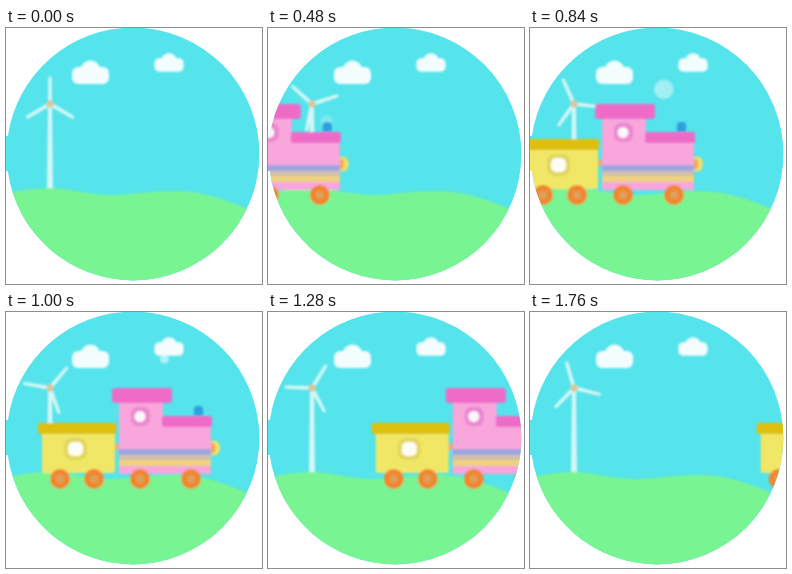
Write an HTML page that moves like this. It is 256 by 256 pixels and loops after 1800 ms.

```html
<!DOCTYPE html>
<html lang="en">
<head>
<meta charset="utf-8">
<title>Train and windmill</title>
<style>
  html, body { margin: 0; width: 100%; height: 100%; overflow: hidden; background: #fff; }
  svg { display: block; width: 100vw; height: 100vh; }
</style>
</head>
<body>
<svg viewBox="0 0 256 256">
  <defs>
    <clipPath id="disc">
      <circle cx="127" cy="126" r="126.4"/>
      <rect y="108" width="4" height="35"/>
    </clipPath>
    <filter id="soft" filterUnits="userSpaceOnUse" x="-20" y="-20" width="300" height="300">
      <feGaussianBlur stdDeviation="1"/>
    </filter>
    <g id="blade"><path d="M-2 0L-1.6 -26Q0 -30 1.6 -26L2 0Z"/></g>
    <g id="wheel">
      <circle r="10" fill="#f0872f"/>
      <circle r="4" fill="#dfa05c"/>
    </g>
    <g id="cloud">
      <rect x="-18.5" y="-8.5" width="37" height="17" rx="6"/>
      <circle cy="-5" r="10"/>
    </g>
  </defs>
  <g clip-path="url(#disc)">
    <rect width="256" height="256" fill="#55e3ec"/>
    <g filter="url(#soft)">
      <g fill="#f3fdfe">
        <use href="#cloud" x="84.5" y="47.5"/>
        <use href="#cloud" transform="translate(163 37) scale(.79)"/>
      </g>
      <g fill="#d6f7f6">
        <path d="M42 78H46L47 161H41Z"/>
        <g id="rotor">
          <use href="#blade"/>
          <use href="#blade" transform="rotate(120)"/>
          <use href="#blade" transform="rotate(240)"/>
        </g>
      </g>
      <circle cx="44" cy="76" r="3.7" fill="#d8c79c"/>
      <path fill="#79f493" d="M-20 170C5 164 25 160 44 160C68 161 82 167 108 167C130 166 145 163 166 163C196 163 215 170 242 181L280 196V280H-20Z"/>

      <circle id="puff" fill="#fff"/>
      <!-- x = 0 is the front wheel of the engine -->
      <g id="train">
        <rect x="-78" y="132" width="8" height="6" fill="#e9a878"/>
        <rect x="-149" y="119" width="73" height="42" rx="2" fill="#f1e766"/>
        <rect x="-153" y="111" width="78" height="11" rx="2" fill="#dfbf10"/>
        <rect x="-127" y="126" width="23" height="22" rx="8" fill="#e2d65c"/>
        <rect x="-123" y="130" width="15" height="14" rx="5" fill="#fdfdf4"/>

        <rect x="3" y="94" width="9" height="13" rx="3" fill="#2f9fdd"/>
        <ellipse cx="23" cy="136" rx="6" ry="7.5" fill="#f2e068"/>
        <rect x="18" y="131" width="6" height="10" rx="2" fill="#eda95c"/>
        <rect x="-72" y="86" width="44" height="76" fill="#f8a6dc"/>
        <rect x="-30" y="108" width="50" height="54" fill="#f8a6dc"/>
        <rect x="-29" y="104" width="50" height="11" rx="2" fill="#ee6cc8"/>
        <rect x="-79" y="76" width="60" height="15" rx="3" fill="#ee6cc8"/>
        <rect x="-60" y="95" width="19" height="19" rx="7" fill="#ec86cf"/>
        <circle cx="-51" cy="104.500" r="5.500" fill="#fdf7fc"/>
        <rect x="-72" y="137" width="92" height="6" fill="#9da5df"/>
        <rect x="-72" y="143" width="92" height="5" fill="#d3c0aa"/>
        <rect x="-72" y="148" width="92" height="6" fill="#efd27e"/>
        <use href="#wheel" x="-131" y="167"/>
        <use href="#wheel" x="-97" y="167"/>
        <use href="#wheel" x="-51" y="167"/>
        <use href="#wheel" y="167"/>
      </g>
    </g>
  </g>
</svg>
<script>
  const LOOP = 1800, STEP = 40;
  const train = document.getElementById('train');
  const rotor = document.getElementById('rotor');
  const puff = document.getElementById('puff');
  const set = (el, attrs) => {
    for (const key in attrs) el.setAttribute(key, attrs[key]);
  };

  function draw(time) {
    const t = Math.floor((time % LOOP) / STEP) * STEP;
    const x = 185 + 0.2562 * (t - 1000);
    set(train, { transform: `translate(${x} 0)` });
    set(rotor, { transform: `translate(44 76) rotate(${t * 720 / LOOP})` });

    // One puff rises from the chimney and falls behind the engine.
    const p = (t - 440) / 640;
    const live = p > 0 && p < 1;
    set(puff, {
      cx: x + 7 - (live ? 44 * p ** 2 : 0),
      cy: 97 - 57 * p,
      r: live ? 3 + 13 * Math.sin(Math.PI * p) ** 0.8 * (1 - 0.55 * p) - 2 * p : 0,
      opacity: live ? 0.2 + 0.4 * p : 0
    });
  }

  const start = performance.now();
  function tick() {
    draw(performance.now() - start);
    requestAnimationFrame(tick);
  }
  tick();
</script>
</body>
</html>
```
